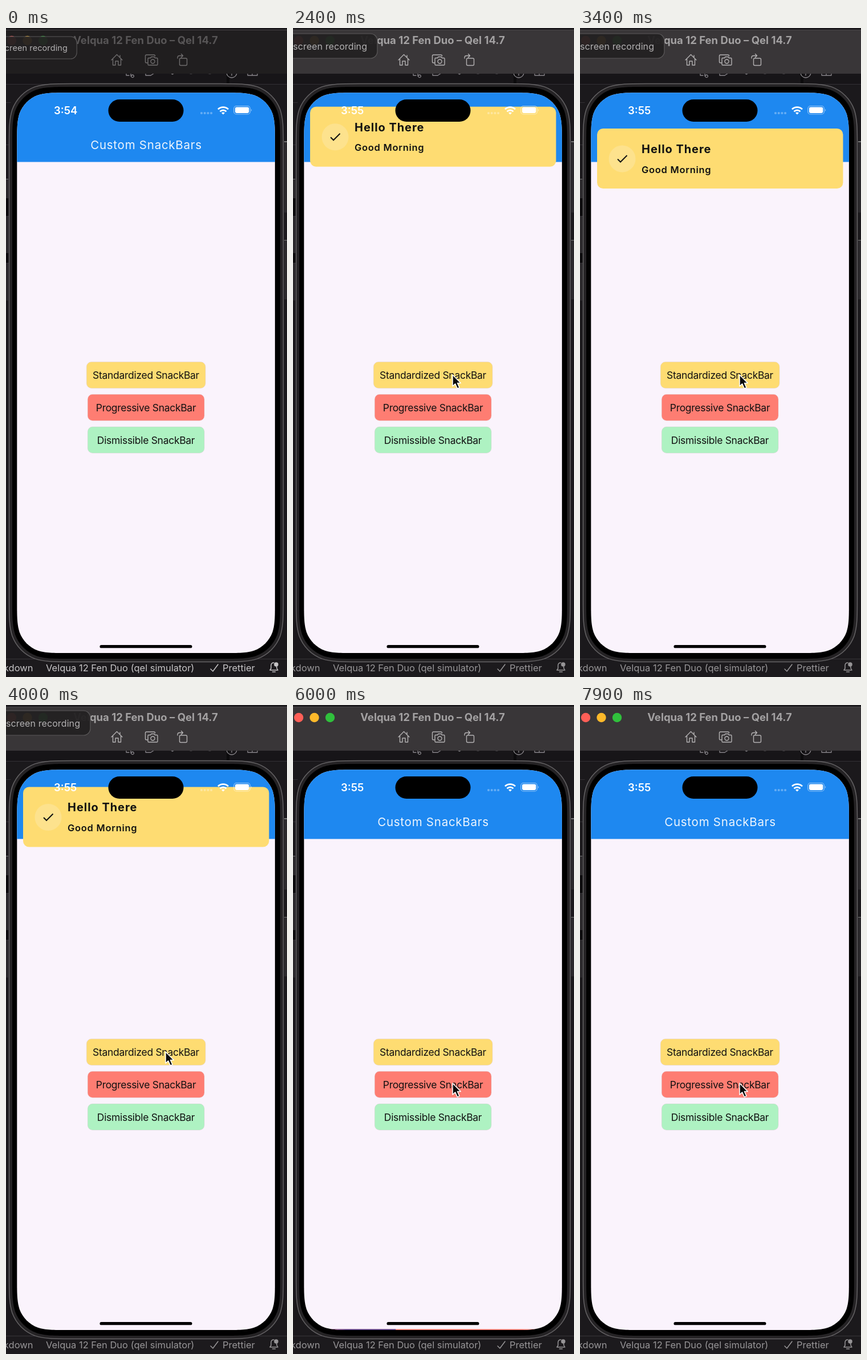
Animation of 493 by 1136 pixels, one loop 8000 ms. Source, as an HTML page:

```html
<!DOCTYPE html>
<html lang="en">
<head>
<meta charset="utf-8">
<title>Custom SnackBars</title>
<style>
html, body { margin: 0; width: 100%; height: 100%; overflow: hidden; background: #1b191c; }
svg { display: block; width: 493px; height: 1136px; font-family: Inter, sans-serif; }
.line { fill: none; stroke-linecap: round; stroke-linejoin: round; }
.mid { text-anchor: middle; }
.label { font-size: 17.5px; letter-spacing: -.3px; fill: #111; }
</style>
</head>
<body>
<svg viewBox="0 0 493 1136">
  <defs>
    <clipPath id="screen"><path id="glass"/></clipPath>
  </defs>

  <!-- editor behind the phone -->
  <rect width="493" height="1136" fill="#1b191c"/>
  <rect y="80" width="493" height="19" fill="#171518"/>
  <path class="line" stroke="#333035" d="M0 98.5H493M0 130.5H8M0 204.5H5M0 329.5H5M0 411.5H5M488 372.5H493"/>
  <path fill="#2b292c" d="M0 265H4V298H0zM0 330H4V394H0zM0 412H4V477H0zM488 200H493V323H488zM488 372H493V475H488z"/>
  <path fill="#0c0b0d" d="M0 298H5V329H0zM0 394H5V411H0zM387 80H392V104H387z"/>
  <path fill="#777" d="M488 198H493V200H488zM488 371H493V372H488zM0 264H4V265H0z"/>
  <g class="line" stroke="#88858a" stroke-width="1.3">
    <path d="M211 80v3h5M219 80v4M222 82a2.300 2.300 0 1 0 .1 0M245 79v4h9l6-4M289 79l3 2 3-2M387 78a9 9 0 0 0 18 0M396 79v4M424 78v5h17v-5M432 78v5"/>
    <path stroke="#4a484c" d="M323 80h3M356 80h3"/>
  </g>

  <!-- simulator title bar -->
  <rect id="bar" y="3" width="493" height="77"/>
  <path d="M0 3.5H493" stroke="#494649"/>
  <circle cx="10" cy="22" r="8.2" fill="#ff5f57"/>
  <circle cx="37.5" cy="22" r="8.2" fill="#fdb92a"/>
  <circle cx="65" cy="22" r="8.2" fill="#30c03c"/>
  <text id="title" class="mid" x="245" y="27.5" font-size="18.5" font-weight="700">Velqua 12 Fen Duo – Qel 14.7</text>
  <g id="tools" class="line" stroke-width="1.4">
    <path d="M185 56l9.500-9.500 9.500 9.500M187.500 54v11h4.500v-7h5v7h4.500V54M200 48v3"/>
    <path d="M248 61h-1.500q-2 0-2-2V49q0-2 2-2h13q2 0 2 2M250.500 52.500h3l1.500-2h5l1.500 2h3q1.500 0 1.500 1.500v9.500q0 1.500-1.500 1.500h-14q-1.500 0-1.500-1.500v-9.500q0-1.500 1.500-1.500z"/>
    <circle cx="257.500" cy="58.500" r="3.500"/>
    <path d="M306.500 53h9q2 0 2 2v8.500q0 2-2 2h-9q-2 0-2-2V55q0-2 2-2zM301 53v-1q0-3.500 3.500-3.500h6M307.500 45.500l3 3-3 3"/>
  </g>

  <!-- status line -->
  <rect y="1104" width="493" height="32" fill="#1c1a1d"/>
  <path d="M0 1104.5H493" stroke="#38353a"/>
  <g id="status" font-size="16.5">
    <text x="47.5" y="1126" text-anchor="end">kdown</text>
    <text x="70" y="1126">Velqua 12 Fen Duo (qel simulator)</text>
    <text x="380" y="1126">Prettier</text>
    <g class="line" stroke="currentColor" stroke-width="1.5">
      <path d="M359 1122l4 4 9-12M463 1124h14l-2-3.500v-3M465 1121v-5q0-5 5-5M465 1121l-2 3M467.500 1127h5"/>
      <circle cx="474" cy="1114" r="3" fill="currentColor"/>
    </g>
  </g>

  <!-- phone -->
  <path id="shell" fill="#252325" stroke="#656365" stroke-width="1.5"/>
  <path id="bezel"/>
  <g clip-path="url(#screen)">
    <rect x="19" y="113" width="453" height="981" fill="#faf3fc"/>
    <rect x="19" y="113" width="453" height="121.5" fill="#1e88f0"/>
    <text class="mid" x="246" y="212" font-size="20.5" letter-spacing=".75" fill="#eef5fd">Custom SnackBars</text>
    <g id="buttons"></g>

    <g id="card">
      <rect x="30" y="176" width="431.5" height="105" rx="10.5" fill="#fedc72"/>
      <circle cx="74" cy="229" r="23.5" fill="#fde28d"/>
      <path class="line" d="M66 229.500l5 5 11.500-11.500" stroke="#111" stroke-width="2" style="stroke-linecap:butt;stroke-linejoin:miter"/>
      <text x="108" y="219" font-size="20" font-weight="700" letter-spacing=".95" fill="#111">Hello There</text>
      <text x="108" y="253.5" font-size="16.5" font-weight="600" letter-spacing=".72" fill="#111">Good Morning</text>
    </g>

    <g id="loader">
      <rect x="19" y="1010.5" width="453" height="84" fill="#fe7d72"/>
      <rect id="seg1" y="1010.5" height="5.5" fill="#5d4a9d"/>
      <rect id="seg2" y="1010.5" height="5.5" fill="#5d4a9d"/>
      <circle cx="43" cy="1055" r="9.5" fill="none" stroke="#1a1111" stroke-width="2"/>
      <path d="M42 1054h2v6h-2zM42 1050h2v2.200h-2z" fill="#1a1111"/>
      <text x="66" y="1061" font-size="16" letter-spacing=".67" fill="#1a1111">Please wait, loading data...</text>
      <rect x="369" y="1038.5" width="70.5" height="33.5" rx="4" fill="#ea8282" stroke="#1a1111" stroke-width="2"/>
      <text class="mid" x="404.3" y="1060.5" font-size="14.5" font-weight="600" letter-spacing=".6" fill="#1a1111">Stop</text>
    </g>
  </g>

  <!-- system overlay -->
  <rect x="179.5" y="125" width="132" height="39" rx="19.5"/>
  <text id="clock" x="84" y="150.5" font-size="18.5" font-weight="600" fill="#fff"></text>
  <path class="line" d="M343 149h.01m5.700 0h.01m5.700 0h.01m5.700 0h.01" stroke="#fff" stroke-opacity=".32" stroke-width="4.2"/>
  <g class="line" stroke="#fff" stroke-width="2.8" style="stroke-linecap:butt">
    <path d="M372 142.300a12.900 12.900 0 0 1 18 0M375.500 146.200a7.900 7.900 0 0 1 11 0"/>
    <path d="M378 148.600q3-2.400 6 0l-3 3z" fill="#fff" stroke="none"/>
  </g>
  <rect x="399.8" y="136.5" width="28.5" height="14.5" rx="4.5" fill="none" stroke="#fff" stroke-opacity=".5" stroke-width="1.2"/>
  <rect x="402" y="138.6" width="24.3" height="10.3" rx="2.8" fill="#fff"/>
  <path d="M430 141.500q2 2.300 0 4.600z" fill="#fff" opacity=".6"/>
  <rect x="164.5" y="1080" width="162" height="5.3" rx="2.65"/>

  <g id="tip">
    <rect x="-30" y="10" width="178" height="43" rx="12" fill="#232122" fill-opacity=".95" stroke="#5b595a" stroke-width="1.2"/>
    <text x="0" y="37.5" font-size="16" letter-spacing=".1" fill="#b3b1b2">screen recording</text>
  </g>

  <path id="cursor" d="M0 0V20L4.600 15.900L8.300 24L12 22.400L8.500 14.500H14.300z" fill="#0b0b0b" stroke="#fff" stroke-width="1.5" stroke-linejoin="round"/>
</svg>
<script>
const LOOP = 8000, STEP = 100;
const $ = id => document.getElementById(id);

// rectangle with continuous-curvature corners
function squircle(x, y, w, h, r) {
  const corner = [[1.529, 0], [1.088, 0], [.868, 0], [.631, .075],
    [.373, .169], [.169, .373], [.075, .631], [0, .868], [0, 1.088], [0, 1.529]];
  const side = (right, bottom) => {
    const points = corner.map(([a, b]) =>
      `${right ? x + w - a * r : x + a * r} ${bottom ? y + h - b * r : y + b * r}`);
    if (right === bottom) points.reverse();
    return `${points[0]}C${points.slice(1).join(" ")}`;
  };
  return `M${side(false, false)}L${side(true, false)}L${side(true, true)}L${side(false, true)}z`;
}

$("glass").setAttribute("d", squircle(19.3, 113.2, 452.6, 980.8, 58));
$("bezel").setAttribute("d", squircle(11, 103, 470, 1001, 67));
$("shell").setAttribute("d", squircle(5.5, 97.5, 481, 1012, 72));

$("buttons").innerHTML = [
  ["Standardized", 141.3, 584.5, 208.7, "#fedc72"],
  ["Progressive", 143.3, 641.3, 204.7, "#fe7d72"],
  ["Dismissible", 143.3, 698.1, 204.7, "#aef2c2"],
].map(([name, x, y, w, fill]) =>
  `<rect x="${x}" y="${y}" width="${w}" height="46" rx="8.5" fill="${fill}" stroke="#d8c8d0" stroke-width=".4"/>
   <text class="label mid" x="245.5" y="${y + 29.5}">${name} SnackBar</text>`).join("");

const linear = p => p;
const easeIn = p => p * p;
const easeOut = p => 1 - (1 - p) ** 3;
const easeInOut = p => p < .5 ? 2 * p * p : 1 - 2 * (1 - p) ** 2;

const ramp = (t, from, to, ease = linear) =>
  ease(Math.min(1, Math.max(0, (t - from) / (to - from))));
const mix = (a, b, p) => a + (b - a) * p;

// CSS-style cubic bezier, solved by bisection
const bezier = (x1, y1, x2, y2) => x => {
  const at = (s, a, b) => 3 * (1 - s) ** 2 * s * a + 3 * (1 - s) * s * s * b + s ** 3;
  let lo = 0, hi = 1;
  for (let i = 0; i < 24; i++) {
    const s = (lo + hi) / 2;
    if (at(s, x1, x2) < x) lo = s; else hi = s;
  }
  return at(lo, y1, y2);
};

// indeterminate progress: two segments per 1800 ms cycle
const segments = [
  ["seg1", 0, 750, bezier(.2, 0, .8, 1), 333, 1083, bezier(.4, 0, 1, 1)],
  ["seg2", 1000, 1567, bezier(0, 0, .65, 1), 1267, 1800, bezier(.1, 0, .45, 1)],
];

// start, title bar, title, tools, status line
const themes = [
  [0, "#201e1f", "#575556", "#6f6d6e", "#c6c4c6"],
  [600, "#242223", "#6b696a", "#777576", "#c6c4c6"],
  [2200, "#393638", "#a3a1a2", "#b3b1b2", "#979597"],
];

// start, end, x, y
const moves = [
  [900, 1300, 227, 604],
  [1800, 2100, 280, 607],
  [4900, 5300, 280, 662],
];

const move = (el, x, y) => el.setAttribute("transform", `translate(${x} ${y})`);

function draw(t) {
  const [, bar, title, tools, status] = themes.filter(row => t >= row[0]).pop();
  $("bar").setAttribute("fill", bar);
  $("title").setAttribute("fill", title);
  $("tools").setAttribute("stroke", tools);
  $("status").setAttribute("fill", status);
  $("status").style.color = status;
  $("clock").textContent = t < 500 ? "3:54" : "3:55";

  const grow = ramp(t, 0, 300, easeOut);
  $("tip").setAttribute("transform",
    `translate(${mix(-10, 0, grow)} ${mix(5.9, 0, grow)}) scale(${mix(.907, 1, grow)})`);
  $("tip").setAttribute("opacity", 1 - ramp(t, 4700, 4900));

  let x = -25, y = 30;
  for (const [from, to, tx, ty] of moves) {
    const p = ramp(t, from, to, easeInOut);
    x = mix(x, tx, p);
    y = mix(y, ty, p);
  }
  move($("cursor"), x, y);

  move($("card"), 0, -177 * (1 - ramp(t, 2200, 2700, easeOut) + ramp(t, 3850, 4200, easeIn)));
  move($("loader"), 0, 84 * (1 - ramp(t, 5950, 6400, easeInOut) + ramp(t, 7400, 7800, easeIn)));

  const cycle = Math.max(0, t - 5712) % 1800;
  for (const [id, h0, h1, headEase, t0, t1, tailEase] of segments) {
    const head = ramp(cycle, h0, h1, headEase);
    const tail = ramp(cycle, t0, t1, tailEase);
    $(id).setAttribute("x", 19 + 453 * tail);
    $(id).setAttribute("width", Math.max(0, 453 * (head - tail)));
  }
}

const start = performance.now();
function tick() {
  const t = (performance.now() - start) % LOOP;
  draw(Math.floor(t / STEP) * STEP);
  requestAnimationFrame(tick);
}
tick();
</script>
</body>
</html>
```
